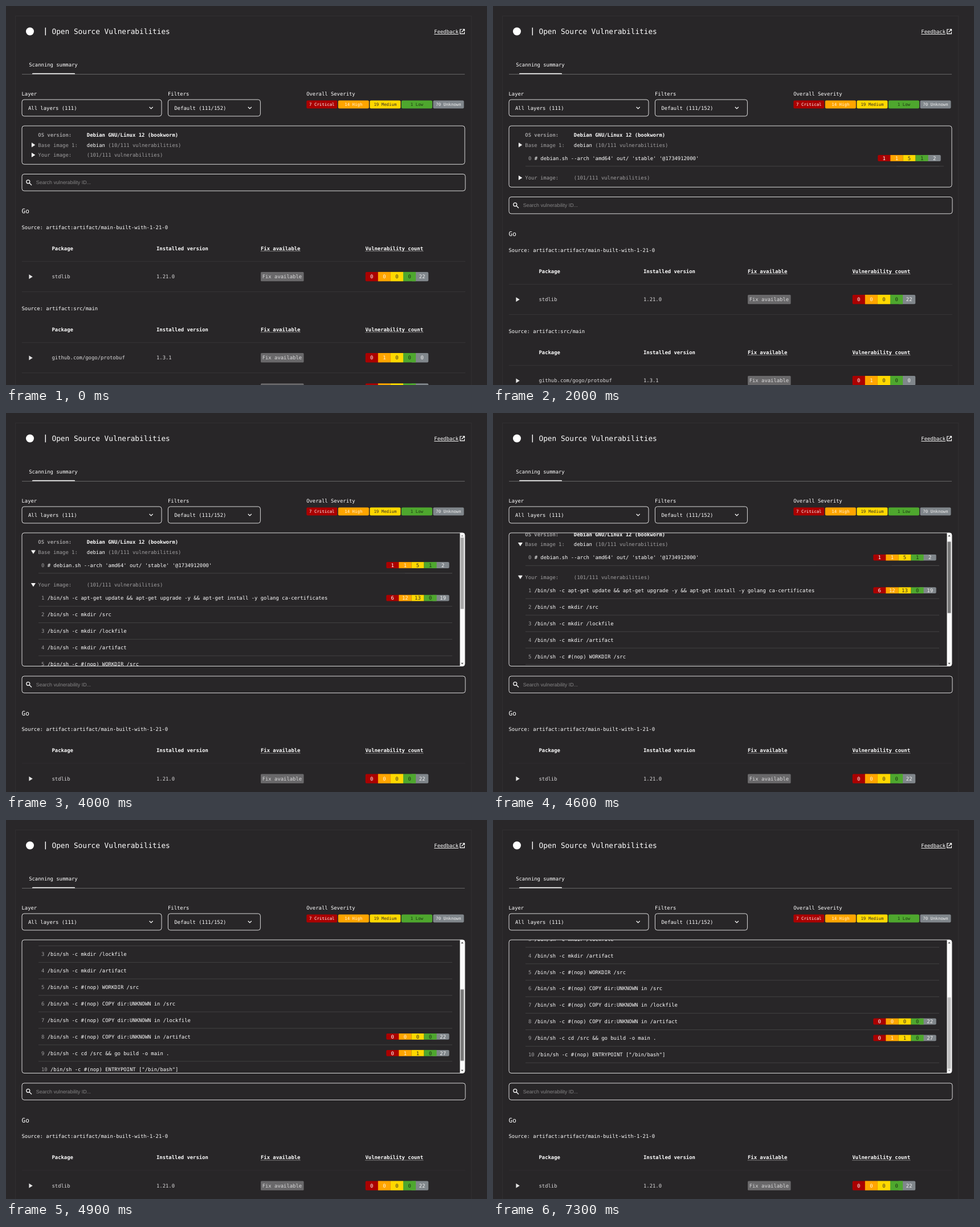
Recreate the animation shown at these times as an HTML page. Size 844 by 664 pixels, loop 8000 ms.

```html
<!DOCTYPE html>
<html lang="en">
<head>
<meta charset="utf-8">
<title>Vulnerability scan report</title>
<style>
html, body { margin: 0; width: 100%; height: 100%; overflow: hidden; background: #292729; }
svg { display: block; width: 844px; height: 664px; }
text { font: 8.9px "DejaVu Sans Mono", monospace; fill: #fff; white-space: pre; text-rendering: geometricPrecision; }
.bold { font-weight: bold; }
.dim { fill: #a09fa0; }
.soft { fill: #dad9da; }
.frame { fill: none; stroke: #f0f0f0; stroke-width: .9; }
.rule { stroke: #3b3a3b; stroke-width: .8; }
.row-rule { stroke: #4a494a; stroke-width: .8; }
.icon { fill: none; stroke: #fff; stroke-width: 1.2; }

#lower, #panel, #yours, #base, #base-end, #layers, #bar, #scroll, #thumb, #up, #down, #row8, #row9 {
  animation: 8s step-end infinite;
}
#lower { animation-name: push; }
@keyframes push { 25% { transform: translateY(40px) } 36.25%, 100% { transform: translateY(166.5px) } }
#panel { animation-name: grow; }
@keyframes grow { 0% { height: 67.3px } 25% { height: 107.3px } 36.25%, 100% { height: 233.5px } }
#yours { animation-name: drop; }
@keyframes drop { 25%, 100% { transform: translateY(40px) } }
#base { animation-name: open-base; }
@keyframes open-base { 0% { visibility: hidden } 25%, 100% { visibility: visible } }
#base-end { animation-name: narrow; }
@keyframes narrow { 0% { transform: translateX(8px) } 36.25%, 100% { transform: none } }
#layers, #bar { animation-name: open-layers; }
@keyframes open-layers { 0% { visibility: hidden } 36.25%, 100% { visibility: visible } }

#base-arrow { animation: turn-base 8s linear infinite; }
@keyframes turn-base { 0%, 25% { transform: rotate(0) } 27.5%, 100% { transform: rotate(90deg) } }
#your-arrow { animation: turn-yours 8s linear infinite; }
@keyframes turn-yours { 0%, 36.24% { transform: rotate(0) } 36.25% { transform: rotate(42deg) } 37.9%, 100% { transform: rotate(90deg) } }

#scroll { animation-name: scroll; }
@keyframes scroll {
  56.25% { transform: translateY(-4px) }
  57.5% { transform: translateY(-13.4px) }
  58.75% { transform: translateY(-56px) }
  60% { transform: translateY(-106px) }
  61.25% { transform: translateY(-147px) }
  62.5%, 100% { transform: translateY(-173.4px) }
}
#thumb { animation-name: thumb, thumb-tone; }
@keyframes thumb {
  56.25% { transform: translateY(2px) }
  57.5% { transform: translateY(7.2px) }
  58.75% { transform: translateY(30px) }
  60% { transform: translateY(56.7px) }
  61.25% { transform: translateY(78.5px) }
  62.5%, 100% { transform: translateY(92.5px) }
}
@keyframes thumb-tone {
  0% { fill: #c1c1c1 } 48.75% { fill: #a8a8a8 } 56.25% { fill: #787878 }
  67.5% { fill: #a8a8a8 } 68.75%, 100% { fill: #c1c1c1 }
}
#up { animation-name: up; }
@keyframes up { 0% { fill: #a3a3a3 } 56.25%, 100% { fill: #505050 } }
#down { animation-name: down; }
@keyframes down { 0% { fill: #505050 } 62.5%, 100% { fill: #a3a3a3 } }

.hover { fill: #333233; }
#row8 { animation-name: hover8; }
@keyframes hover8 { 0% { visibility: hidden } 68.75% { visibility: visible } 72.5%, 100% { visibility: hidden } }
#row9 { animation-name: hover9; }
@keyframes hover9 { 0% { visibility: hidden } 72.5% { visibility: visible } 91.25%, 100% { visibility: hidden } }
</style>
</head>
<body>
<svg id="stage" viewBox="0 0 844 664"></svg>
<script>
const levels = [
  ['7 Critical', '#aa0000', '#fff'],
  ['14 High', '#ffa500', '#fff3dc'],
  ['19 Medium', '#ffd800', '#34302a'],
  ['1 Low', '#4ea72e', '#1d3514'],
  ['70 Unknown', '#80868b', '#f2f2f2']
];

const rect = (x, y, w, h, attrs = '') => `<rect x="${x}" y="${y}" width="${w}" height="${h}" ${attrs}/>`;
const line = (x1, x2, y, cls = 'rule') => `<path class="${cls}" d="M${x1} ${y}H${x2}"/>`;
const group = (id, ...parts) => `<g id="${id}">${parts.join('')}</g>`;
const span = (cls, s) => `<tspan class="${cls}">${s}</tspan>`;

// y is the middle of the capitals
const text = (x, y, s, cls = '', size = 8.9, more = '') =>
  `<text x="${x}" y="${y + size * .365}" class="${cls}" style="font-size:${size}px;${more}">${s}</text>`;
const centred = (x, y, s, fill, size) => text(x, y, s, '', size, `text-anchor:middle;fill:${fill}`);

const arrow = (x, y, id = '', fill = '#fff') =>
  `<g transform="translate(${x} ${y})"><path ${id && `id="${id}"`} fill="${fill}" d="M-3 -4L3.4 0L-3 4Z"/></g>`;
const chevron = x => `<path class="icon" d="M${x - 3} 177l3 3l3 -3"/>`;

function counts(x, y, h, values) {
  const w = 22.1;
  const cell = (i, dx, width, r) => rect(x + dx, y - h / 2, width, h, `rx="${r}" fill="${levels[i][1]}"`);
  return cell(0, 0, 30, 2) + cell(4, 80, 30.5, 2) +
    [1, 2, 3].map(i => cell(i, i * w, w, 0)).join('') +
    values.map((v, i) => centred(x + (i + .5) * w, y, v, levels[i][2], 8.9)).join('');
}

function header(y) {
  const dotted = (x, s) => text(x, y, s, 'bold') +
    `<path d="M${x} ${y + 5}h${s.length * 5.36}" stroke="#fff" stroke-width=".8" stroke-dasharray=".9 .9"/>`;
  return text(80.5, y, 'Package', 'bold') + text(264, y, 'Installed version', 'bold') +
    dotted(447, 'Fix available') + dotted(630.5, 'Vulnerability count') + line(28, 806, y + 23);
}

const packageRow = (y, name, version, values) =>
  arrow(43.4, y + .2, '', '#e4e4e4') + text(80.5, y, name, 'soft') + text(264, y, version, 'soft') +
  rect(447, y - 8.2, 75.5, 16.4, 'rx="1.5" fill="#69686a"') + text(449.7, y, 'Fix available', 'soft') +
  counts(630.7, y, 16.4, values) + line(28, 806, y + 26.5);

const layerText = (y, n, command) => text(62, y, span('dim', n + ' ') + command);

const severity = levels.map(([label, fill, ink], i) =>
  rect(527.3 + i * 55.55, 165.5, 54, 14, `rx="2" fill="${fill}"`) +
  centred(554.3 + i * 55.55, 172.5, label, ink, 7.4)).join('');

const masthead = [
  rect(16.5, 17.5, 800, 700, 'fill="#282628" stroke="#312f31"'),
  '<circle cx="42" cy="44.5" r="7" fill="#fff"/>',
  rect(68.6, 37.8, 1.4, 13.6, 'fill="#fff"'),
  text(80.5, 44.5, 'Open Source Vulnerabilities', '', 12.75),
  text(751.3, 44.8, 'Feedback', '', 8.9, 'text-decoration:underline'),
  '<path class="icon" d="M800 41H796.8V48.6H804.4V45.3M801.4 40.9H804.5V44M804.2 41.2L799.4 46"/>',
  text(40.2, 102.6, 'Scanning summary'),
  '<path d="M28 119.6H805" stroke="#686768"/><path d="M46 119.3v-.5q0-1 1-1H120q1 0 1 1v.5z" fill="#fff"/>',
  text(27.5, 153.3, 'Layer'), text(284, 153.3, 'Filters'), text(527.2, 153.3, 'Overall Severity'),
  rect(28, 164, 245, 29, 'rx="4" class="frame"'), rect(284.4, 164, 162, 29, 'rx="4" class="frame"'),
  text(39, 178.6, 'All layers (111)'), text(295.5, 178.6, 'Default (111/152)'),
  chevron(254.6), chevron(427.8), severity
].join('');

const commands = [
  'apt-get update &amp;&amp; apt-get upgrade -y &amp;&amp; apt-get install -y golang ca-certificates',
  'mkdir /src', 'mkdir /lockfile', 'mkdir /artifact', '#(nop) WORKDIR /src',
  ...['src', 'lockfile', 'artifact'].map(dir => `#(nop) COPY dir:UNKNOWN in /${dir}`),
  'cd /src &amp;&amp; go build -o main .', '#(nop) ENTRYPOINT ["/bin/bash"]'
];
const layerCounts = { 1: [6, 12, 13, 0, 19], 8: [0, 0, 0, 0, 22], 9: [0, 1, 1, 0, 27] };

const layerRows = commands.map((command, i) => {
  const n = i + 1, y = 324.1 + i * 28.9;
  const hover = n === 8 || n === 9 ? rect(57, y - 14.4, 726, 28.8, `id="row${n}" class="hover"`) : '';
  return hover + layerText(y, n, '/bin/sh -c ' + command) +
    (layerCounts[n] ? counts(667.2, y, 10.8, layerCounts[n]) : '') + line(57, 783, y + 14.5, 'row-rule');
}).join('');

const scrollTrack = group('bar',
  rect(796.5, 210, 9, 234, 'fill="#fafafa"'),
  rect(797.6, 218.3, 5.8, 125, 'id="thumb"'),
  '<path id="up" d="M798.3 216.2h4.4l-2.2-2.6z"/><path id="down" d="M798.3 437.7h4.4l-2.2 2.6z"/>');

const panelContent = group('scroll',
  text(56.3, 226, 'OS version:', 'dim bold'), text(141.8, 226, 'Debian GNU/Linux 12 (bookworm)', 'bold'),
  arrow(47.9, 243.4, 'base-arrow'), text(56.3, 243.3, 'Base image 1:', 'dim'),
  text(141.8, 243.3, 'debian' + span('dim', ' (10/111 vulnerabilities)')),
  group('base',
    layerText(266.5, 0, "# debian.sh --arch 'amd64' out/ 'stable' '@1734912000'"),
    line(57, 783, 280.7, 'row-rule'),
    group('base-end', line(700, 783, 280.7, 'row-rule'), counts(667.2, 266.5, 10.8, [1, 1, 5, 1, 2]))),
  group('yours', arrow(47.9, 261, 'your-arrow'), text(56.3, 260.9, 'Your image:', 'dim'),
    text(141.8, 260.9, '(101/111 vulnerabilities)', 'dim')),
  group('layers', layerRows));

const lowerPage = group('lower',
  rect(28, 294.5, 778, 29.4, 'rx="4" class="frame"'),
  '<path class="icon" d="M41 310l4 4"/><circle class="icon" cx="38.8" cy="307.8" r="3"/>',
  text(52.8, 309, 'Search vulnerability ID...', '', 8.88, 'font-family:\'Liberation Sans\',sans-serif;fill:#858485'),
  text(27.5, 359, 'Go', '', 11.1),
  text(27.5, 387.4, 'Source: artifact:artifact/main-built-with-1-21-0'),
  header(424.6), packageRow(474.1, 'stdlib', '1.21.0', [0, 0, 0, 0, 22]),
  text(27.5, 529.7, 'Source: artifact:src/main'),
  header(566.7), packageRow(616.2, 'github.com/gogo/protobuf', '1.3.1', [0, 1, 0, 0, 0]),
  packageRow(669.4, '', '', [0, 0, 0, 0, 0]));

document.getElementById('stage').innerHTML =
  '<clipPath id="view"><rect x="28" y="210" width="777" height="233.5" rx="4"/></clipPath>' +
  masthead + `<g clip-path="url(#view)">${panelContent}${scrollTrack}</g>` +
  rect(28, 210, 777, 67.3, 'id="panel" rx="4" class="frame"') + lowerPage;
</script>
</body>
</html>
```
